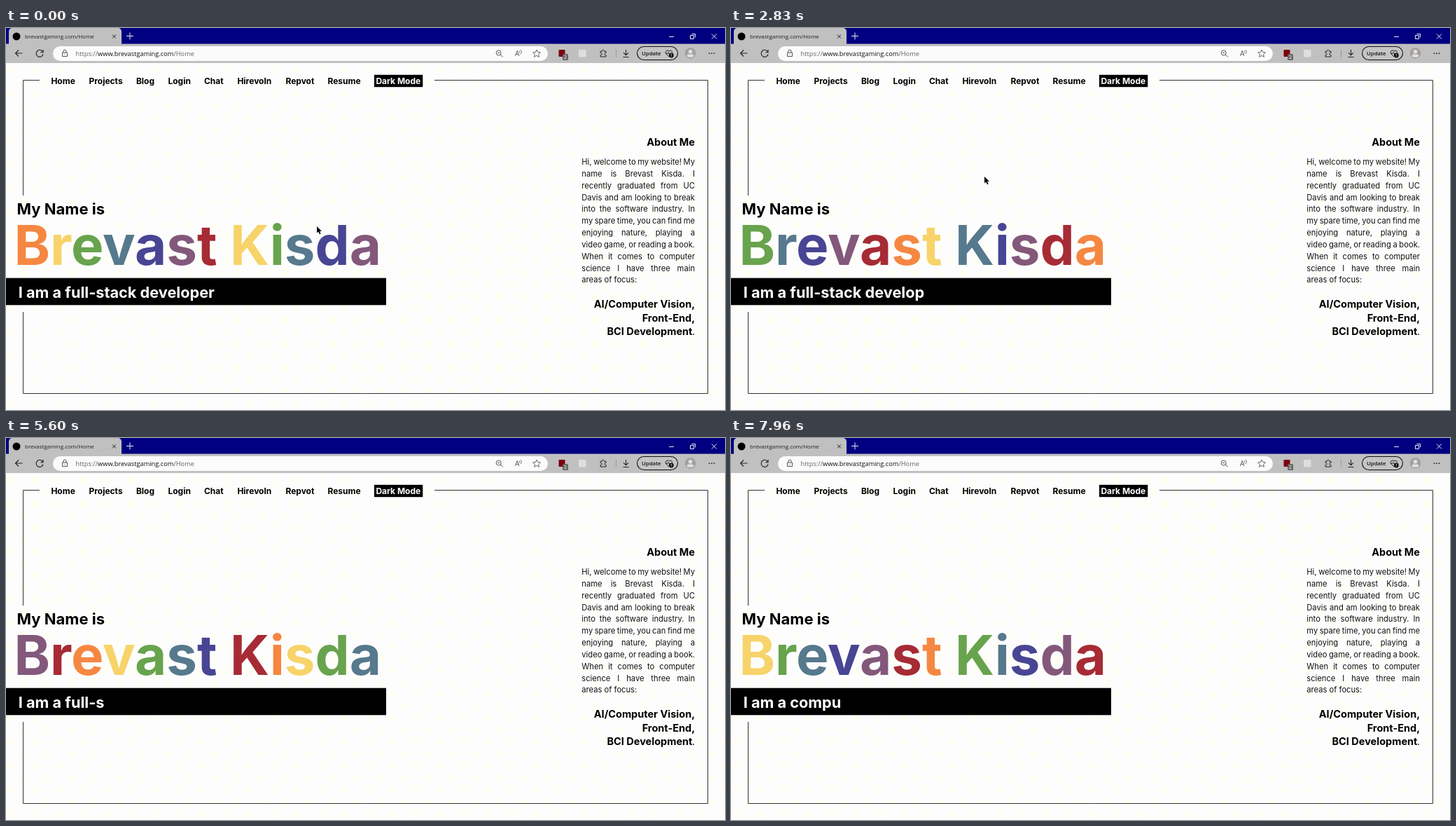
These frames come from a looping animation (1027x545 px, 8000 ms). An HTML page with a canvas:

```html
<!DOCTYPE html>
<html lang="en">
<head>
<meta charset="utf-8">
<title>Portfolio home</title>
<style>
  html, body { margin: 0; width: 100%; height: 100%; overflow: hidden; background: #fdfdfd; }
  canvas { display: block; }
</style>
</head>
<body>
<canvas id="stage" width="1027" height="545"></canvas>
<script>
const W = 1027, H = 545, LOOP = 8000;
const ctx = document.getElementById('stage').getContext('2d');
const page = document.createElement('canvas');
page.width = W;
page.height = H;

const INTER = 'Inter, sans-serif', UI = '"Open Sans", sans-serif';
const COLORS = ['#a62b35', '#f58742', '#f7d36a', '#68a34d', '#56798d', '#484594', '#83587b'];
const NAME = 'Brevast Kisda';
const OLD = 'I am a full-stack developer', NEXT = 'I am a computer';
const KEEP = 7;

// Moments at which the name shifts colour, a letter goes, a letter comes
const SHIFTS = [930, 1830, 3000, 4130, 5060, 5860, 6860, 7860];
const ERASE = [2500, 2730, 3000, 3200, 3400, 3600, 3760, 3930, 4230, 4300,
  4630, 5060, 5260, 5460, 5800, 6000, 6260, 6460, 6660, 6860];
const TYPE = [7100, 7300, 7500, 7700, 7930];
const PATH = [[2600, 444, 283], [2830, 362, 212], [3160, 362, 212], [3560, 200, -20]];

const passed = (list, t) => list.filter(x => x <= t).length;

function text(g, s, x, y, font, color = '#000', align = 'left') {
  g.font = font;
  g.fillStyle = color;
  g.textAlign = align;
  g.fillText(s, x, y);
  return g.measureText(s).width;
}

function box(g, x, y, w, h, r, fill, stroke) {
  g.beginPath();
  g.roundRect(x, y, w, h, r);
  if (fill) { g.fillStyle = fill; g.fill(); }
  if (stroke) { g.strokeStyle = stroke; g.stroke(); }
}

function disc(g, x, y, r, fill) {
  g.beginPath();
  g.arc(x, y, r, 0, 7);
  g.fillStyle = fill;
  g.fill();
}

function line(g, d, color = '#222', width = 1) {
  g.strokeStyle = color;
  g.lineWidth = width;
  g.stroke(new Path2D(d));
}

function justify(g, s, x, y, width, font) {
  g.font = font;
  const words = s.split(' ');
  const sum = words.reduce((a, w) => a + g.measureText(w).width, 0);
  const gap = (width - sum) / (words.length - 1);
  for (const w of words) x += text(g, w, x, y, font, '#111') + gap;
}

function drawBrowser(g) {
  g.fillStyle = '#000080';
  g.fillRect(0, 0, W, 23);
  g.fillStyle = '#c0c0c0';
  g.fillRect(0, 22.6, W, 27.4);
  box(g, 4, 0, 161, 25, [5, 5, 0, 0], '#c0c0c0');
  disc(g, 15, 12, 5.5, '#000');
  text(g, 'brevastgaming.com/Home', 27, 14.5, '8px ' + UI, '#222');
  line(g, 'M152 9.5l5 5m0-5l-5 5');
  line(g, 'M172 11.5h10M177 6.5v10', '#e8e8f4');
  line(g, 'M947 12.5h7M1008 8.5l7 7m0-7l-7 7', '#e8e8f4');
  line(g, 'M977.5 10.5h5v5h-5zM979.5 8.5h5v5', '#e8e8f4');

  box(g, 67, 26, 707, 21, 10.5, '#fbfbfb');
  line(g, 'M13.5 36h10M18 31.5L13.5 36l4.5 4.5', '#222', 1.1);
  line(g, 'M52.8 34.5a5 5 0 1 0 .2 3M53 31v3.7h-3.7', '#222', 1.1);
  line(g, 'M80.5 35h7v5.5h-7zM82 35v-2a2 2 0 0 1 4 0v2M84 37.3v1', '#555');
  const font = '9.25px ' + UI;
  let x = 99.5;
  x += text(g, 'https://', x, 39.5, font, '#666');
  x += text(g, 'www.brevastgaming.com', x, 39.5, font, '#111');
  text(g, '/Home', x, 39.5, font, '#666');

  line(g, 'M707.2 35.5a3.5 3.5 0 1 0-7 0a3.5 3.5 0 1 0 7 0M706.3 38l3.5 3.5M702 35.5h3.4', '#555');
  text(g, 'A', 727, 40, '10px ' + UI, '#555');
  line(g, 'M733 32.5q1.6 1.5 0 3M735 31q3 3 0 6', '#555', .8);
  line(g, 'M758 31l1.6 3.5 3.8.4-2.8 2.6.8 3.8-3.4-1.9-3.4 1.9.8-3.8-2.8-2.6 3.8-.4z', '#555', .9);

  box(g, 789.5, 31, 9, 10, 1, '#7d0010');
  box(g, 795, 37, 8, 9, 1.5, '#666');
  text(g, '2', 799, 44.3, '7.5px ' + UI, '#fff', 'center');
  box(g, 818, 31, 10.5, 10.5, 1, '#dedede');
  line(g, 'M849 33.3h2.4a1.6 1.6 0 1 1 3 0h2.6v2.2a1.6 1.6 0 1 0 0 3v2.5h-8v-2.4a1.6 1.6 0 1 0 0-3z');
  line(g, 'M871.5 31v11', '#999');
  line(g, 'M885.5 31v7.5M882 35.3l3.5 3.4 3.5-3.4M881.5 41.5h8', '#222', 1.1);
  g.lineWidth = 1.1;
  box(g, 901.5, 26.5, 58, 19, 9.5, '#c4c4c4', '#111');
  text(g, 'Update', 908, 39, '600 7.8px ' + UI, '#111');
  line(g, 'M947 41l-4.2-4.3a2.7 2.7 0 0 1 4.2-3.7a2.7 2.7 0 0 1 4.6 2.2M942 36.3h3l1.2-1.5 1.6 3 1-1.5');
  disc(g, 950.3, 39, 3.4, '#111');
  line(g, 'M950.3 37v2.4M950.3 40.3v.8', '#fff', .8);
  disc(g, 977.5, 36, 7.8, '#a3a09e');
  disc(g, 977.5, 33.8, 2.8, '#e2e0df');
  box(g, 972.8, 37.4, 9.4, 4.4, [3, 3, 4, 4], '#e2e0df');
  for (const dx of [-3.5, 0, 3.5]) disc(g, 1008 + dx, 36.2, .9, '#222');
}

function drawSite(g) {
  g.fillStyle = '#fdfdfe';
  g.fillRect(0, 0, W, H);
  for (let row = 0, y = 60; y < H + 10; y += 17, row++)
    for (let x = row % 2 * 17 + 8; x < W + 10; x += 34) disc(g, x, y, 6, '#fefef5');

  line(g, 'M48 74.5H24.5V239M24.5 405V521.5H1002.5V74.5H612', '#333');

  const nav = [['Home', 65], ['Projects', 119], ['Blog', 186.5], ['Login', 232], ['Chat', 283.5],
    ['Hirevoln', 331], ['Repvot', 400], ['Resume', 460]];
  const navFont = '700 12px ' + INTER;
  for (const [s, x] of nav) text(g, s, x - .6, 80.2, navFont);
  g.fillStyle = '#000';
  g.fillRect(525.9, 66.8, 69.4, 17.4);
  text(g, 'Dark Mode', 528.4, 80.2, navFont, '#fff');

  text(g, 'My Name is', 15.6, 266, '700 22px ' + INTER);
  g.fillStyle = '#000';
  g.fillRect(0, 356.7, 543, 38.6);

  const head = '700 14.5px ' + INTER, body = '11.2px ' + INTER;
  text(g, 'About Me', 984, 168.3, head, '#000', 'right');
  const about = ['Hi, welcome to my website! My', 'name is ' + NAME + '. I',
    'recently graduated from UC', 'Davis and am looking to break', 'into the software industry. In',
    'my spare time, you can find me', 'enjoying nature, playing a', 'video game, or reading a book.',
    'When it comes to computer', 'science I have three main'];
  about.forEach((s, i) => justify(g, s, 822.3, 195 + i * 16.84, 161.7, body));
  text(g, 'areas of focus:', 822.3, 363.4, body, '#111');
  text(g, 'AI/Computer Vision,', 984, 399.3, head, '#000', 'right');
  text(g, 'Front-End,', 984, 418.5, head, '#000', 'right');
  text(g, 'BCI Development', 980.4, 437.7, head, '#000', 'right');
  text(g, '.', 984, 437.7, '14px ' + INTER, '#000', 'right');
}

function drawName(t) {
  const font = '700 78px ' + INTER, shift = passed(SHIFTS, t) + 1;
  ctx.font = font;
  [...NAME].forEach((c, i) => {
    const x = 11.5 + ctx.measureText(NAME.slice(0, i + 1)).width - ctx.measureText(c).width;
    text(ctx, c, x, 337.5, font, COLORS[(i + shift) % COLORS.length]);
  });
}

function drawTyping(t) {
  const font = '700 21.7px ' + INTER, x = 17.8, y = 384.6;
  const typed = passed(TYPE, t);
  const s = typed ? NEXT.slice(0, KEEP + typed) : OLD.slice(0, OLD.length - passed(ERASE, t));
  const w = text(ctx, s, x, y, font, '#fff');
  const caretOn = t >= 60 && Math.floor((t + 900) / 500) % 2 === (t < 100 ? 1 : 0);
  if (caretOn) text(ctx, '|', x + w, y, font, '#fff');
}

function drawPointer(t) {
  if (t >= PATH[3][0]) return;
  let [, x, y] = PATH[0];
  for (let i = 1; i < PATH.length; i++) {
    const [t0, x0, y0] = PATH[i - 1], [t1, x1, y1] = PATH[i];
    if (t < t0) break;
    const u = Math.min(1, (t - t0) / (t1 - t0)), e = u * u * (3 - 2 * u);
    x = x0 + (x1 - x0) * e;
    y = y0 + (y1 - y0) * e;
  }
  ctx.save();
  ctx.translate(x, y);
  const arrow = new Path2D('M0 0V9.6L2.2 7.6L3.9 11.2L5.6 10.4L4 7H7z');
  ctx.strokeStyle = '#fff';
  ctx.lineWidth = 1;
  ctx.stroke(arrow);
  ctx.fillStyle = '#000';
  ctx.fill(arrow);
  ctx.restore();
}

function frame() {
  const t = performance.now() % LOOP;
  ctx.drawImage(page, 0, 0);
  drawName(t);
  drawTyping(t);
  drawPointer(t);
  requestAnimationFrame(frame);
}

const g = page.getContext('2d');
drawSite(g);
drawBrowser(g);
frame();
</script>
</body>
</html>
```
